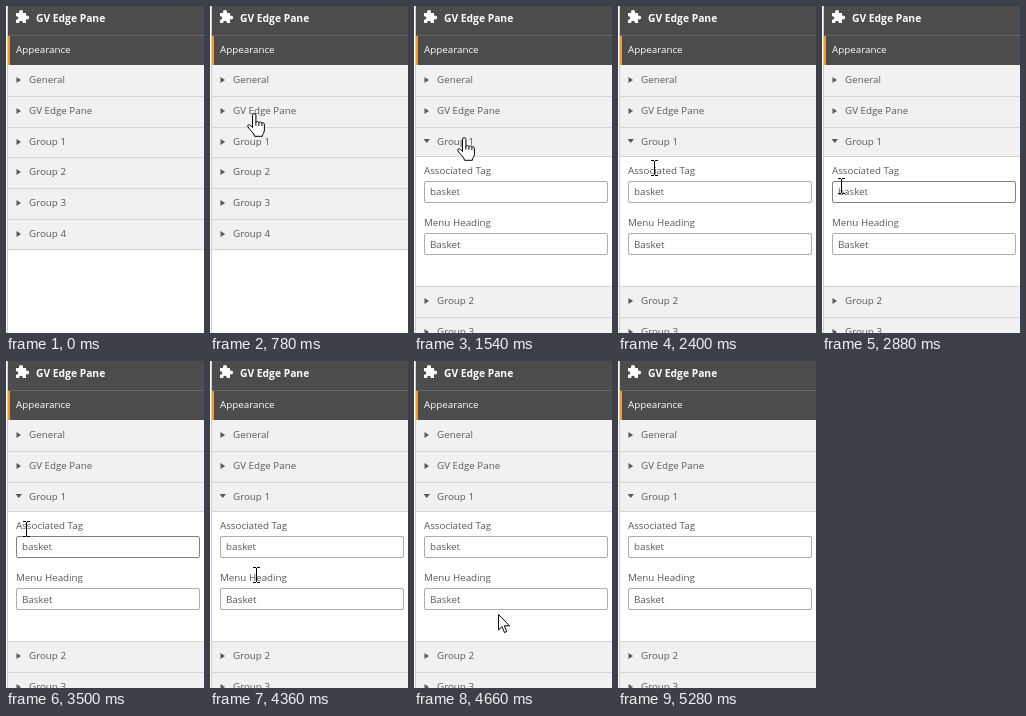
Write an HTML page that moves like this. It is 198x327 px and loops after 5920 ms.

```html
<!DOCTYPE html>
<html lang="en">
<head>
<meta charset="utf-8">
<title>Side panel</title>
<style>
  html, body { margin: 0; width: 100%; height: 100%; overflow: hidden; background: #fff; }
  svg { display: block; width: 198px; height: 327px; font: 9.8px "Open Sans", "Noto Sans", sans-serif; fill: #595959; }
  rect { shape-rendering: crispEdges; }
  .field { fill: #fff; stroke: #acacac; shape-rendering: auto; }
  .field.hot { stroke: #808080; }
  .cursor { fill: #fff; stroke: #000; stroke-linejoin: round; }
</style>
</head>
<body>
<svg viewBox="0 0 198 327">
  <rect x="1" width="1" height="327" fill="#ccc"/>
  <g id="rows"></g>
  <g id="panel">
    <rect x="2" y="150" width="196" height="1" fill="#d5d5d5"/>
    <rect x="2" y="151" width="196" height="129" fill="#fff"/>
    <text x="10" y="168">Associated Tag</text>
    <rect class="field" x="10.5" y="175.5" width="183" height="21" rx="1.5"/>
    <text x="16" y="189">basket</text>
    <text x="10" y="220">Menu Heading</text>
    <rect class="field" x="10.5" y="227.5" width="183" height="21" rx="1.5"/>
    <text x="16" y="242">Basket</text>
  </g>
  <rect x="2" width="196" height="59" fill="#4c4c4c"/>
  <rect x="2" y="29" width="196" height="1" fill="#666"/>
  <rect x="2" y="30" width="2" height="29" fill="#f8981d"/>
  <g fill="#fff">
    <rect x="10" y="7" width="10" height="10"/>
    <circle cx="15" cy="6" r="2.1"/>
    <circle cx="21" cy="11.5" r="2.1"/>
    <g fill="#4c4c4c"><circle cx="10.5" cy="12" r="1.8"/><circle cx="15" cy="16.5" r="1.8"/></g>
    <text x="30" y="16" font-size="10.3" font-weight="700">GV Edge Pane</text>
    <text x="10" y="47">Appearance</text>
  </g>
  <path class="cursor" id="hand" d="M5.5 14.5V2.4a1.7 1.7 0 0 1 3.4 0V9.5a1.6 1.6 0 0 1 3 .3a1.6 1.6 0 0 1 3 .6a1.4 1.4 0 0 1 2.5 .9V17c0 3-2 3.5-2 6.3H7.5C7.3 20 3.5 18 1 14c-1-1.8 1-3 2.3-1.8zM8.9 9.5v3M11.9 9.8v3M14.9 10.4v2.6"/>
  <path class="cursor" id="arrow" d="M.5 .5V16L4 12.7L6.5 18.5L8.8 17.5L6.3 11.8H11.5z"/>
  <path class="cursor" id="beam" d="M-3-7.5H0M1-7.5H4M.5-7V7M-3 7.5H0M1 7.5H4"/>
</svg>
<script>
const LOOP = 5920, STEP = 80, OPEN_AT = 1540, OPEN_SHIFT = 129;
const get = id => document.getElementById(id);

// start ms, steps, cursor, from x, y, to x, y
const moves = [
  [540, 1, 'arrow', 107, 253, 107, 253],
  [620, 3, 'hand', 76, 188, 37, 107],
  [1000, 3, 'hand', 38, 113, 39, 137],
  [1400, 1, 'hand', 43, 131, 43, 131],
  [2240, 2, 'hand', 41, 133, 38, 143],
  [2400, 3, 'beam', 36, 162, 24, 181],
  [2720, 3, 'beam', 22, 178, 19, 180],
  [2940, 5, 'beam', 20, 186, 23, 214],
  [3340, 3, 'beam', 22, 204, 20, 168],
  [3580, 3, 'beam', 18, 174, 12, 200],
  [3820, 1, 'beam', 16, 210, 16, 210],
  [3880, 1, 'beam', 24, 217, 24, 217],
  [3960, 3, 'beam', 26, 222, 33, 213],
  [4280, 2, 'beam', 42, 213, 46, 214],
  [4420, 3, 'beam', 52, 220, 76, 247],
  [4660, 2, 'arrow', 84, 253, 91, 257],
  [4980, 4, 'arrow', 95, 261, 157, 314],
  [5280, 1, '', 0, 0, 0, 0]
];
// hover times of each field
const hovers = [[[2480, 3100], [3420, 3740]], [[4500, 4660]]];

const edges = [59, 90, 121, 151, 182, 213, 243];
const labels = ['General', 'GV Edge Pane', 'Group 1', 'Group 2', 'Group 3', 'Group 4'];
const closed = y => `M10.5 ${y - 3}l4.5 3l-4.5 3z`;
const opened = y => `M9.5 ${y - 2}h6.5l-3.25 4z`;

get('rows').innerHTML = labels.map((label, i) => {
  const top = edges[i], end = edges[i + 1], mid = Math.round(74 + 30.8 * i);
  return `<g><rect x="2" y="${top}" width="196" height="${end - top}" fill="#f1f1f1"/>
    <rect x="2" y="${end}" width="196" height="1" fill="#d5d5d5"/>
    ${i ? `<rect x="2" y="${top}" width="196" height="1" fill="#d5d5d5"/>` : ''}
    <path d="${closed(mid)}"/><text x="23" y="${mid + 3}">${label}</text></g>`;
}).join('');

const rows = [...get('rows').children];
const fields = document.querySelectorAll('.field');

function draw(now) {
  const t = now % LOOP, open = t >= OPEN_AT;
  rows.slice(3).forEach(row => row.setAttribute('transform', `translate(0 ${open ? OPEN_SHIFT : 0})`));
  rows[2].querySelector('path').setAttribute('d', open ? opened(135) : closed(136));
  get('panel').style.display = open ? '' : 'none';
  fields.forEach((field, i) =>
    field.classList.toggle('hot', hovers[i].some(([from, to]) => t >= from && t < to)));

  const move = moves.filter(m => m[0] <= t).pop() || [0, 1, ''];
  const [start, steps, kind, x0, y0, x1, y1] = move;
  const k = steps > 1 ? Math.min(Math.floor((t - start) / STEP), steps - 1) / (steps - 1) : 0;
  const mix = (a, b) => Math.round(a + (b - a) * k);
  for (const id of ['hand', 'arrow', 'beam']) {
    get(id).style.display = id === kind ? '' : 'none';
  }
  if (kind) get(kind).setAttribute('transform', `translate(${mix(x0, x1)} ${mix(y0, y1)})`);
}

const began = performance.now();
function tick() {
  draw(performance.now() - began);
  requestAnimationFrame(tick);
}
tick();
</script>
</body>
</html>
```
